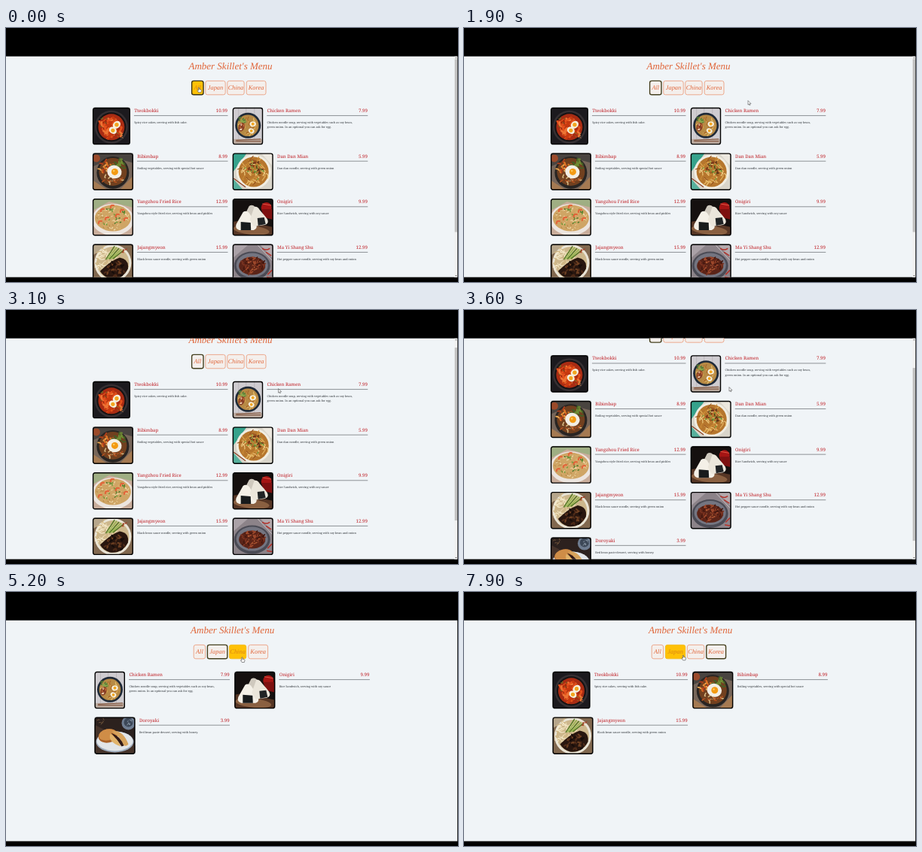
Write an HTML page that moves like this. It is 600 px wide and 338 px high and loops after 8000 ms.

```html
<!DOCTYPE html>
<html lang="en">
<head>
<meta charset="utf-8">
<title>Amber Skillet's Menu</title>
<style>
html, body { margin: 0; width: 100%; height: 100%; overflow: hidden; background: #000; }
svg { display: block; width: 100vw; height: 100vh; }
text { font-family: "Noto Serif", serif; text-rendering: geometricPrecision; }
.script { font-family: "Liberation Serif", serif; font-style: italic; fill: #e0663a; text-anchor: middle; }
.dish { font-size: 6px; fill: #bf1e24; }
.price { font-size: 6.2px; text-anchor: end; }
.note { font-size: 3.78px; fill: #33383d; }
.tab rect { fill: #f4efec; stroke: #eba183; stroke-width: .9; }
.tab.active rect { stroke: #45401f; stroke-width: 1.4; }
.tab.hover rect { fill: #ffc107; stroke: #f3bb1c; }
.tab.hover.active rect { stroke: #3a3210; }
.tab.hover text { fill: #d98413; }
</style>
</head>
<body>
<svg id="stage" viewBox="0 0 600 338" preserveAspectRatio="none"></svg>
<script>
let seed = 7;
const rnd = () => (seed = seed * 16807 % 2147483647) / 2147483647;

// Drawing helpers that return SVG markup
const box = (x, y, w, h, fill) => `<rect x="${x}" y="${y}" width="${w}" height="${h}" fill="${fill}"/>`;
const oval = (x, y, rx, ry, fill, turn = 0) =>
  `<ellipse cx="${x}" cy="${y}" rx="${rx}" ry="${ry}" fill="${fill}" transform="rotate(${turn} ${x} ${y})"/>`;
const disc = (x, y, r, fill) => oval(x, y, r, r, fill);
const shape = (d, fill) => `<path d="${d}" fill="${fill}"/>`;
const line = (d, color, width) =>
  `<path d="${d}" fill="none" stroke="${color}" stroke-width="${width}" stroke-linecap="round"/>`;
const egg = (x, y, r, turn = 0) => oval(x, y, r, r * .8, "#f6f0df", turn) + disc(x, y, r * .48, "#f2a51f");

// Scatters short strokes over an ellipse
function bits(n, x, y, rx, ry, colors, len, width) {
  let out = "";
  for (let i = 0; i < n; i++) {
    const a = rnd() * 6.283, r = Math.sqrt(rnd()), b = rnd() * 6.283;
    const px = x + Math.cos(a) * r * rx, py = y + Math.sin(a) * r * ry;
    const dx = Math.cos(b) * len, dy = Math.sin(b) * len;
    out += line(`M${px.toFixed(1)} ${py.toFixed(1)}q${(dy / 2).toFixed(1)} ${(dx / 2).toFixed(1)} ${dx.toFixed(1)} ${dy.toFixed(1)}`,
      colors[i % colors.length], width);
  }
  return out;
}

const photos = {
  tteok: () => box(0, 0, 50, 49, "#1c1a1e") + disc(25, 26, 22, "#363033") + disc(25, 26, 19.5, "#151214") +
    disc(25, 26, 17.5, "#a92c13") + bits(32, 24, 26, 14, 14, ["#e4511c", "#c8390f", "#ee7434"], 6, 2.6) +
    bits(9, 14, 20, 5, 7, ["#5d7f2a", "#7a1b0c"], 2, 1) + egg(32, 23, 5.6, -40) + egg(27, 30.5, 5.4, 40) +
    bits(8, 34, 37, 7, 4, ["#79902f", "#f0a060"], 1.5, .8),
  ramen: () => box(0, 0, 40, 49, "#cfccd0") + [8, 18, 29].map(x => line(`M${x} 0V49`, "#b5b1b5", .7)).join("") +
    box(0, 42, 40, 7, "#b9a99e") + disc(20.5, 24, 17, "#1f2a38") + disc(20.5, 24, 14.3, "#b78a45") +
    bits(24, 21, 24, 11, 11, ["#e0bb68", "#a9682c", "#d8a34a"], 5, 1.2) +
    bits(12, 14, 16, 6, 4, ["#527232", "#89a64b"], 3, 1.6) + oval(12, 26, 4, 6, "#873f25", 20) +
    bits(6, 13, 27, 3, 5, ["#c86d3b", "#edcfae"], 2, 1.2) + egg(27, 22, 4.2) + egg(25, 31, 4, 30) +
    line("M5 43.5L37 42M5 45L37 45", "#7c4b32", 1),
  bibim: () => box(0, 0, 54, 49, "#77665a") + shape("M0 0H54V13L28 6 0 18z", "#494440") +
    shape("M0 36L20 49H0zM54 30V49H36z", "#a57a52") + disc(27, 26, 21.5, "#292523") + disc(27, 25, 18.5, "#71401f") +
    bits(18, 18, 20, 8, 8, ["#df7526", "#b43f1b", "#edaa53"], 4, 1.8) +
    bits(16, 35, 16, 8, 6, ["#435f25", "#6f8e35"], 4, 1.7) +
    bits(18, 26, 36, 12, 5, ["#d7ba83", "#744423", "#b8521f"], 4, 1.5) +
    oval(29, 25, 9.8, 8.8, "#f3eee4", 20) + disc(29.5, 25, 4.5, "#f39a13") + disc(28.3, 23.7, 1.2, "#ffcf62") +
    disc(5, 7, 5, "#9b4a2a"),
  dandan: () => box(0, 0, 54, 49, "#d9d5ca") + shape("M0 0H19L0 26z", "#36a28c") +
    shape("M0 33L14 49H0z", "#57b09c") + shape("M54 0V18L38 0z", "#ece8df") +
    disc(28, 25, 23, "#f1ede2") + disc(28, 25, 20, "#b6762d") +
    bits(58, 28, 26, 17, 17, ["#e3b25e", "#c98b36", "#f0ce86", "#975622"], 7, 1.1) +
    bits(20, 30, 20, 10, 8, ["#5c3319", "#7c3519"], 2, 1.6) +
    bits(18, 29, 23, 13, 13, ["#618e2e", "#8fae4a"], 1.6, 1.3) + line("M2 34L17 45", "#8b3f22", 1.2),
  yang: () => box(0, 0, 54, 49, "#c9ad9b") + shape("M0 0H54V12L22 4 0 16z", "#9fae83") +
    oval(27, 28, 28, 21, "#ece5df") + oval(27, 26, 24, 17.5, "#cfa565") +
    bits(80, 27, 26, 22, 16, ["#e6c98f", "#f0dcae", "#b98a48", "#d8b06c"], 1.8, 1.1) +
    bits(22, 27, 25, 20, 14, ["#6c9a38", "#49792a"], 1.5, 1.3) +
    [[13, 15], [26, 10], [39, 16], [44, 27], [19, 26], [33, 22], [10, 31]]
      .map(([x, y]) => line(`M${x - 2} ${y + 2}q0-4 4-3`, "#e2653a", 2.3)).join(""),
  onigiri: () => box(0, 0, 54, 49, "#15100f") + shape("M0 31L12 29 54 38V49H0z", "#563625") +
    oval(25, 42, 24, 6, "#8a6041", 6) + disc(45, 12, 7, "#a51514") + shape("M38 14H54V28L42 25z", "#7d1010") +
    line("M40 7L51 9", "#e35545", 1) +
    shape("M22 10q4-3 8 1L42 22q5 6 0 9L25 34 13 28z", "#cfc9be") +
    shape("M14 18q4-3 8 1L31 33q3 7-3 9H9q-6-2-4-8z", "#f4f0e7") +
    shape("M29 11q4-1 7 4L46 27q3 6-3 8L28 37 23 28z", "#ebe6db") +
    shape("M11 31L24 32 24.5 42H11z", "#181b1c") + shape("M33 26L42 25 44 34 34 36z", "#202325"),
  jajang: () => box(0, 0, 54, 49, "#81684f") + shape("M0 0H25L0 15z", "#b7a68b") + disc(27, 25, 24.5, "#e9e4d6") +
    disc(27, 25, 21.5, "#cdb78c") + bits(36, 16, 20, 11, 15, ["#eadbb5", "#cfb581", "#f5eacb"], 7, 1.2) +
    shape("M10 36Q24 22 36 18Q49 20 47 33Q39 48 23 46Q14 43 10 36z", "#28160f") +
    bits(32, 31, 34, 14, 10, ["#4f2b18", "#160c09", "#6e4022"], 2.5, 2) +
    [0, 2.4, 4.8, 7.2, 9.6].map((s, i) => line(`M${18 + s} ${20 - s * .1}L${29 + s * 1.2} ${3 + s * .6}`,
      i % 2 ? "#98b951" : "#587d27", 1.6)).join("") + bits(4, 43, 9, 4, 4, ["#a43c23"], 2, 1.2),
  mayi: () => box(0, 0, 54, 49, "#8c8389") + shape("M0 0H22L0 19z", "#aaa1a7") + shape("M36 0H54V20z", "#b3a9ac") +
    oval(26, 29, 24, 19, "#4b4b55") + oval(26, 28, 21, 16, "#747581") + oval(26, 29, 17.5, 12, "#5b2418") +
    bits(62, 26, 28, 16, 11, ["#7d3421", "#42170f", "#a24b2d", "#632415"], 3.6, 1.6) +
    bits(9, 26, 27, 13, 8, ["#b96b3d"], 1, 1) +
    line("M40 6q5 3 9 0M45 11l6 4M47 40l5-5M46 44l6 1", "#b3322a", 1.5) + line("M34 2L53 22", "#c7bfc1", 1),
  dora: () => box(0, 0, 54, 49, "#2c211e") + shape("M0 10L54 38V49H0z", "#46332a") + disc(45, 8, 9, "#6f7d91") +
    disc(45, 7, 6, "#3c4757") + bits(8, 45, 7, 5, 4, ["#9aa7b5"], 2, .8) +
    oval(27, 33, 25, 14, "#9eacbd") + oval(27, 32, 24, 13, "#e2e5e8") +
    oval(18, 25, 13, 9, "#aa6127", -12) + oval(17.5, 23.5, 12, 7.5, "#cf8d47", -12) +
    shape("M23 19Q37 16 45 36Q42 40 38 37Q34 26 23 19z", "#d7a35c") +
    shape("M22 21Q34 25 39 38L36 39Q30 30 22 21z", "#321a15") +
    shape("M21 22Q17 33 35 39Q31 29 21 22z", "#e1b36b") + bits(5, 10, 6, 6, 3, ["#70543b"], 3, 1)
};

// photo, width, name, price, kitchen, description lines
const dishes = [
  ["tteok", 50, "Tteokbokki", "10.99", "Korea", "Spicy rice cakes, serving with fish cake."],
  ["ramen", 40.5, "Chicken Ramen", "7.99", "Japan", "Chicken noodle soup, serving with vegetables such as soy bean,", "green onion. In an optional you can ask for egg."],
  ["bibim", 54, "Bibimbap", "8.99", "Korea", "Boiling vegetables, serving with special hot sauce"],
  ["dandan", 54, "Dan Dan Mian", "5.99", "China", "Dan dan noodle, serving with green onion"],
  ["yang", 54, "Yangzhou Fried Rice", "12.99", "China", "Yangzhou style fried rice, serving with bean and pickles"],
  ["onigiri", 54, "Onigiri", "9.99", "Japan", "Rice Sandwich, serving with soy sauce"],
  ["jajang", 54, "Jajangmyeon", "15.99", "Korea", "Black bean sauce noodle, serving with green onion"],
  ["mayi", 54, "Ma Yi Shang Shu", "12.99", "China", "Hot pepper sauce noodle, serving with soy bean and onion"],
  ["dora", 54, "Doroyaki", "3.99", "Japan", "Red bean paste dessert, serving with honey."]
];
const tabs = [["All", 246.6, 15.4], ["Japan", 264.8, 26.4], ["China", 293.8, 22.4], ["Korea", 319.2, 25.8]];

const dishMarkup = ([photo, w, name, price, , ...notes]) => `<g class="item">
  <svg width="${w}" height="49.5">${photos[photo]()}</svg>
  <path d="M0 0H${w}V49.5H0zM3.4 1.5Q1.5 1.5 1.5 3.4V46.1Q1.5 48 3.4 48H${w - 3.4}Q${w - 1.5} 48 ${w - 1.5} 46.1V3.4Q${w - 1.5} 1.5 ${w - 3.4} 1.5z" fill="none"/>
  <path d="M0 0h3L0 3zM${w} 0v3l-3-3zM0 49.5v-3l3 3zM${w} 49.5h-3l3-3z" fill="#f0f4f7"/>
  <rect x=".7" y=".7" width="${w - 1.4}" height="48.1" rx="2.4" fill="none" stroke="#000" stroke-width="1.4"/>
  <text class="dish" x="${w + 5.4}" y="6.2">${name}</text>
  <text class="dish price" x="179.2" y="6.2">${price}</text>
  ${line(`M${w + 5.4} 10.8H179.2`, "#62666a", .7)}
  ${notes.map((s, i) => `<text class="note" x="${w + 5.4}" y="${21.2 + i * 6.5}">${s}</text>`).join("")}</g>`;

const tabMarkup = ([name, x, w]) => `<g class="tab"><rect x="${x}" y="70.4" width="${w}" height="18.4" rx="2.6"/>
  <text class="script" x="${x + w / 2}" y="82.3" font-size="8.4">${name}</text></g>`;

const stage = document.getElementById("stage");
stage.innerHTML = `<clipPath id="view"><rect y="37.5" width="599.4" height="294.3"/></clipPath>
<rect width="600" height="338"/>
<g clip-path="url(#view)">
  ${box(0, 37.5, 599.4, 294.3, "#f0f4f7")}
  <g id="page">
    <text class="script" x="298" y="54.5" font-size="13">Amber Skillet's Menu</text>
    ${tabs.map(tabMarkup).join("")}${dishes.map(dishMarkup).join("")}
  </g>
  <g id="bar">${box(595.2, 37.5, 4.2, 294.3, "#f1f1f1")}
    ${shape("M596.2 40.3h2.4l-1.2-1.4zM596.2 329h2.4l-1.2 1.4z", "#666")}
    <rect id="thumb" x="595.7" width="3.2" height="230" fill="#c1c1c1"/></g>
</g>
<g id="arrow">${shape("M0 0V5.2L1.2 4.1 2 5.9 2.8 5.5 2 3.8H3.7z", "#fff")}
  ${line("M0 0V5.2L1.2 4.1 2 5.9 2.8 5.5 2 3.8H3.7z", "#222", .45)}</g>
<g id="hand"><path d="M-.6 .4Q0-.4 .6 .4V2.5L3 3.1Q3.6 3.4 3.4 4.8L2.8 6.8H-.3L-2 4.4Q-2 3.4-.6 4.2z" fill="#fff" stroke="#222" stroke-width=".5"/></g>`;

const [page, bar, thumb, arrow, hand] = ["page", "bar", "thumb", "arrow", "hand"].map(id => document.getElementById(id));
const items = [...document.querySelectorAll(".item")];
const tabNodes = [...document.querySelectorAll(".tab")];

// Keys are [time, value, ...]; eased between neighbours
const pointer = [[0, 256, 79], [400, 256, 79], [1000, 330, 92], [1700, 377, 97], [2300, 377, 97], [3100, 361.5, 105],
  [3600, 352, 103], [4000, 283, 77], [4600, 283, 78], [5100, 314, 87.5], [5300, 313, 86], [5600, 309, 80],
  [6000, 309, 80], [6500, 335, 81], [7200, 335, 81], [7800, 291, 84], [8000, 291, 84]];
const scroll = [[0, 0], [2950, 0], [3100, 11], [3300, 62], [3500, 62], [3800, 0], [8000, 0]];
const picks = [[0, "All"], [4300, "Japan"], [5650, "China"], [6950, "Korea"]];

function at(keys, t) {
  const i = keys.findIndex(k => k[0] > t), a = keys[i - 1], b = keys[i];
  const u = (t - a[0]) / (b[0] - a[0]), s = u * u * (3 - 2 * u);
  return a.slice(1).map((v, j) => v + (b[j + 1] - v) * s);
}

const move = (node, x, y) => node.setAttribute("transform", `translate(${x.toFixed(2)} ${y.toFixed(2)})`);
const show = (node, on) => node.setAttribute("display", on ? "inline" : "none");

function draw(t) {
  const [x, y] = at(pointer, t), [top] = at(scroll, t);
  const pick = picks.filter(p => p[0] <= t).pop()[1], all = pick === "All";
  const shift = all ? 0 : 2.6;
  move(page, shift, -top);
  show(bar, all);
  thumb.setAttribute("y", 41.5 + top * .78);

  let slot = 0;
  items.forEach((node, i) => {
    const on = all || dishes[i][4] === pick;
    show(node, on);
    if (on) move(node, 114.9 + slot % 2 * 185.8, 105.8 + Math.floor(slot++ / 2) * 60.6);
  });

  let over = false;
  tabs.forEach(([name, left, w], i) => {
    const px = x - shift - left, py = y + top - 70;
    const hit = px > 0 && px < w && py > 0 && py < 19;
    over = over || hit;
    tabNodes[i].classList.toggle("hover", hit);
    tabNodes[i].classList.toggle("active", name === pick);
  });
  show(hand, over);
  show(arrow, !over);
  move(over ? hand : arrow, x, y);
}

const start = performance.now();
function tick() {
  draw((performance.now() - start) % 8000);
  requestAnimationFrame(tick);
}
tick();
</script>
</body>
</html>
```
